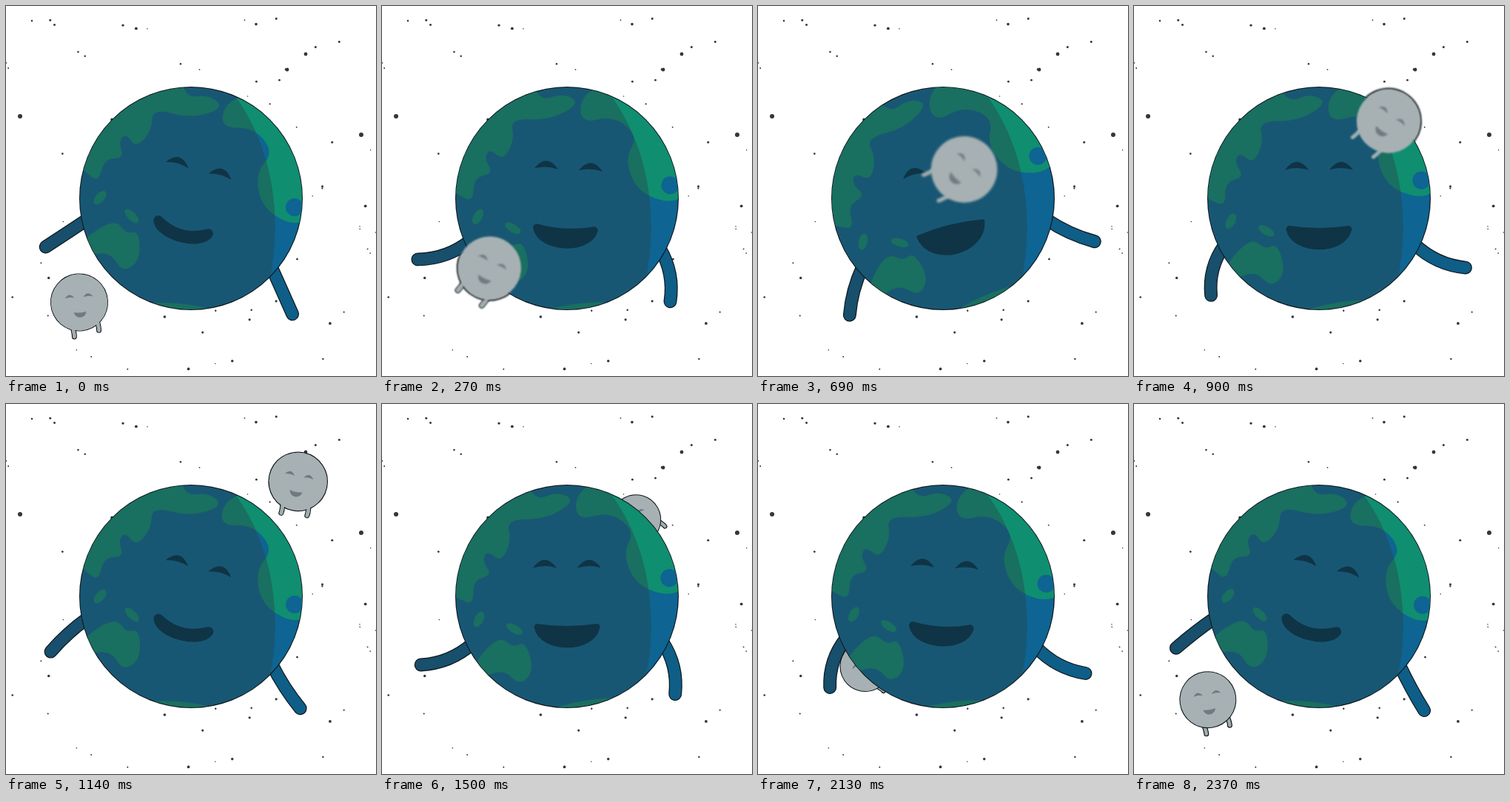
An HTML page with a canvas that plays this animation: 500 px wide and 500 px high, repeating every 2.4 s.

```html
<!DOCTYPE html>
<html lang="en">
<head>
<meta charset="utf-8">
<title>Earth and Moon</title>
<style>
  html, body { margin: 0; width: 100%; height: 100%; overflow: hidden; background: #fff; }
  canvas { display: block; width: 500px; height: 500px; }
</style>
</head>
<body>
<canvas id="stage" width="500" height="500"></canvas>
<script>
const ctx = document.getElementById('stage').getContext('2d');
const TAU = Math.PI * 2, DEG = Math.PI / 180;
const LOOP = 2400, ROCK = 1200, TILT = 15;
const CX = 250, CY = 260, R = 150;
const OCEAN = '#0e6492', LAND = '#108e70', FACE = '#0f3446', EDGE = '#0e171c';

// Key points of the three large lands, as they lie at full right tilt.
const lands = [
  [[236,95], [244,124], [275,120], [295,138], [250,152], [198,138], [197,168], [176,192], [162,172],
   [152,184], [160,206], [133,206], [125,238], [108,225], [80,200], [120,90]],
  [[340,115], [296,130], [290,165], [335,164], [362,198], [337,225], [346,275], [400,302], [440,250], [420,110]],
  [[95,325], [125,300], [150,290], [162,308], [180,304], [181,345], [157,360], [142,333], [110,336]]
];

const disc = (x, y, r) => { ctx.beginPath(); ctx.arc(x, y, r, 0, TAU); };
const polar = (deg, r) => [r * Math.cos(deg * DEG), r * Math.sin(deg * DEG)];

function randomSource(seed) {
  return () => (seed = (seed * 16807) % 2147483647) / 2147483647;
}

function scatterStars(count) {
  const random = randomSource(77);
  const list = [{ x: 19, y: 149, r: 3 }, { x: 480, y: 174, r: 3 }, { x: 405, y: 65, r: 2.4 }, { x: 380, y: 86, r: 2.4 }];
  while (list.length < count)
    list.push({ x: random() * 500, y: 15 + random() * 482, r: 0.7 + 1.2 * random() });
  return list;
}
const stars = scatterStars(85);

function scoped(x, y, deg, draw) {
  ctx.save();
  ctx.translate(x, y);
  ctx.rotate(deg * DEG);
  draw();
  ctx.restore();
}

// Symmetric cubic-bezier(a, 0, 1 - a, 1).
function ease(p, a) {
  let lo = 0, hi = 1, s = 0.5;
  for (let i = 0; i < 24; i++) {
    s = (lo + hi) / 2;
    const q = 1 - s;
    const x = 3 * q * q * s * a + 3 * q * s * s * (1 - a) + s * s * s;
    if (x < p) lo = s; else hi = s;
  }
  return s * s * (3 - 2 * s);
}

// 0 -> 1 -> 0 over one period.
function pingPong(t, period, a) {
  const p = (t % period) / period * 2;
  return ease(p < 1 ? p : 2 - p, a);
}

function blob(points) {
  const n = points.length;
  ctx.beginPath();
  for (let i = 0; i <= n; i++) {
    const [x, y] = points[i % n], [u, v] = points[(i + 1) % n];
    if (i === 0) ctx.moveTo((x + u) / 2, (y + v) / 2);
    else ctx.quadraticCurveTo(x, y, (x + u) / 2, (y + v) / 2);
  }
  ctx.fill();
}

function oval(x, y, rx, ry, deg) {
  ctx.beginPath();
  ctx.ellipse(x, y, rx, ry, deg * DEG, 0, TAU);
  ctx.fill();
}

function eye(x, y, w) {
  const h = w / 16;
  ctx.beginPath();
  ctx.moveTo(x - w, y + 5 * h);
  ctx.quadraticCurveTo(x, y - 17 * h, x + w, y + 5 * h);
  ctx.quadraticCurveTo(x, y, x - w, y + 5 * h);
  ctx.fill();
}

function drawStars() {
  ctx.fillStyle = '#343638';
  for (const { x, y, r } of stars) { disc(x, y, r); ctx.fill(); }
}

function limb(path, width, color, outlined) {
  ctx.lineCap = 'round';
  const passes = outlined ? [[width + 2.4, EDGE], [width, color]] : [[width, color]];
  for (const [w, c] of passes) {
    ctx.beginPath();
    path();
    ctx.lineWidth = w;
    ctx.strokeStyle = c;
    ctx.stroke();
  }
}

function drawArm(rootDeg, tipDeg, reach, bow, color) {
  const [x, y] = polar(rootDeg, 143), [u, v] = polar(tipDeg, reach);
  const dx = u - x, dy = v - y, len = Math.hypot(dx, dy);
  limb(() => {
    ctx.moveTo(x, y);
    ctx.quadraticCurveTo((x + u) / 2 + dy / len * bow, (y + v) / 2 - dx / len * bow, u, v);
  }, 15.5, color, true);
}

function drawMouth(open) {
  const x = 35 + 10 * open, y = 40 + 3 * open, bottom = 59 + 27 * open;
  ctx.beginPath();
  ctx.moveTo(-x, y);
  ctx.quadraticCurveTo(0, 60 - 25 * open, x, y);
  ctx.bezierCurveTo(x - 7, bottom, 7 - x, bottom, -x, y);
  ctx.closePath();
  ctx.lineWidth = 13 - 8 * open;
  ctx.lineJoin = 'round';
  ctx.strokeStyle = FACE;
  ctx.fill();
  ctx.stroke();
}

function drawLands() {
  ctx.translate(-CX, -CY);
  ctx.fillStyle = LAND;
  lands.forEach(blob);
  oval(127, 259, 11, 6, -48);
  oval(170, 284, 12, 5.5, 45);
  oval(232, 414, 60, 12, 5);
  ctx.fillStyle = OCEAN;
  oval(390, 272, 12, 12, 0);
}

function drawEarth(tilt) {
  ctx.save();
  disc(CX, CY, R);
  ctx.lineWidth = 2;
  ctx.strokeStyle = EDGE;
  ctx.stroke();
  ctx.clip();
  ctx.fillStyle = OCEAN;
  ctx.fill();
  scoped(CX, CY, tilt - TILT, drawLands);
  // The night side stays put while the globe rocks.
  ctx.fillStyle = 'rgba(37,70,74,.43)';
  ctx.beginPath();
  ctx.moveTo(300, 109);
  ctx.lineTo(309, 121);
  ctx.bezierCurveTo(353, 180, 377, 270, 356, 372);
  ctx.lineTo(350, 420);
  ctx.lineTo(90, 420);
  ctx.lineTo(90, 109);
  ctx.fill();
  ctx.restore();

  scoped(CX, CY, tilt, () => {
    ctx.fillStyle = FACE;
    eye(-30, -43.5, 16);
    eye(30, -43.5, 16);
    drawMouth((1 - tilt / TILT) / 2);
  });
}

function drawMoon({ x, y, r, spin, swing, blur }, outlined) {
  ctx.save();
  if (blur > 0.2) ctx.filter = `blur(${blur}px)`;
  scoped(x, y, spin + swing, () => {
    for (const side of [-0.45 * r, 0.45 * r])
      limb(() => {
        ctx.moveTo(side, 0.85 * r);
        ctx.quadraticCurveTo(side, 1.05 * r, side - 1, 1.14 * r);
      }, r * 0.12, '#a3adb0', outlined);
  });
  scoped(x, y, spin, () => {
    disc(0, 0, r);
    if (outlined) {
      ctx.lineWidth = 2 + 2 * blur;
      ctx.strokeStyle = EDGE;
      ctx.stroke();
    }
    ctx.fillStyle = '#a7b1b4';
    ctx.fill();
    ctx.fillStyle = '#707b80';
    eye(-0.33 * r, -0.23 * r, 0.17 * r);
    eye(0.33 * r, -0.23 * r, 0.17 * r);
    ctx.beginPath();
    ctx.moveTo(-0.22 * r, 0.34 * r);
    ctx.quadraticCurveTo(0, 0.4 * r, 0.22 * r, 0.34 * r);
    ctx.bezierCurveTo(0.18 * r, 0.6 * r, -0.18 * r, 0.6 * r, -0.22 * r, 0.34 * r);
    ctx.fill();
  });
  ctx.restore();
}

function render(t) {
  const tilt = TILT * (1 - 2 * pingPong(t, ROCK, 0.5));
  const wave = Math.sin(t / ROCK * TAU);
  const orbit = t / LOOP * TAU, depth = Math.sin(orbit);
  const along = 299 * pingPong(t, LOOP, 0.25);
  const moon = {
    x: 99 + along,
    y: 400.5 - along,
    r: 38 + 7 * depth,
    spin: 46 * Math.sin(orbit - 6 * DEG),
    swing: 25 * depth - 10,
    blur: 1.6 * Math.max(0, depth)
  };

  ctx.clearRect(0, 0, 500, 500);
  drawStars();
  drawMoon(moon, true);
  scoped(CX, CY, tilt, () => {
    drawArm(153.5, 146.5 + 8.5 * wave, 207 + 11 * wave, 13 * wave, '#174f6c');
    drawArm(25.5, 33.7 + 8.5 * wave, 208 - 11 * wave, 13 * wave, '#0e5e87');
  });
  drawEarth(tilt);
  if (depth >= 0) drawMoon(moon, false);
}

function tick() {
  render(performance.now() % LOOP);
  requestAnimationFrame(tick);
}
tick();
</script>
</body>
</html>
```
